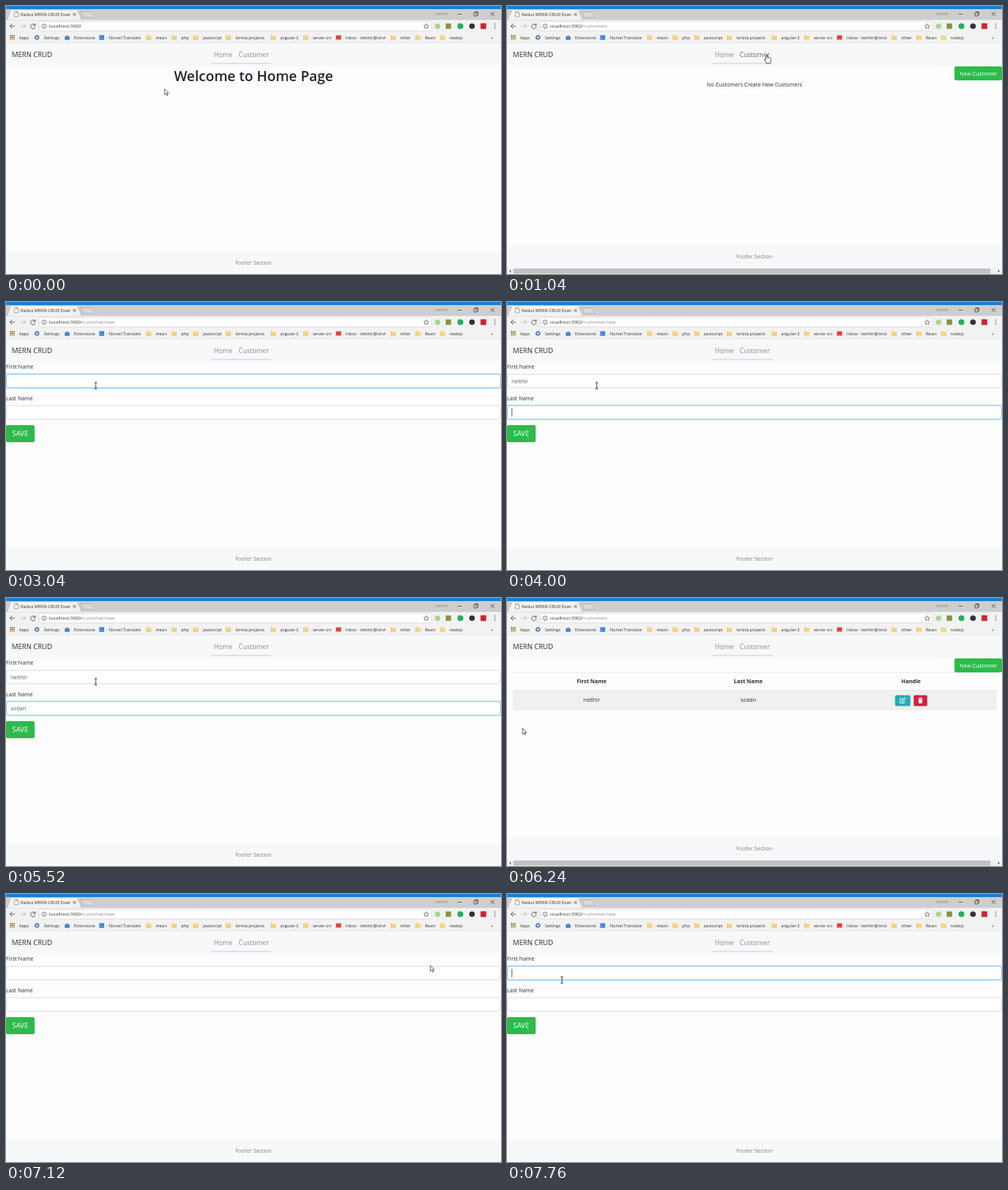
An HTML page that plays this animation: 640x346 px, repeating every 8 s.

```html
<!DOCTYPE html>
<html lang="en">
<head>
<meta charset="utf-8">
<title>MERN CRUD</title>
<style>
html, body { margin: 0; width: 100%; height: 100%; overflow: hidden; background: #fdfdfd; }
svg { display: block; width: 640px; height: 346px; font: 7px "Open Sans", "Noto Sans", sans-serif; fill: #2b3035; }
.small { font-size: 5.45px; fill: #333; }
.mid { text-anchor: middle; }
.link { font-size: 8.5px; fill: #8c8d8f; }
.green { fill: #2dba4b; }
.white { fill: #fff; }
.input { fill: #fff; stroke: #d3d7db; stroke-width: .8; }
.halo { fill: none; stroke: #c4dfff; stroke-width: 2.4; }
.value { fill: #555b61; }
.line { fill: none; stroke: #555; stroke-width: .9; }
</style>
</head>
<body>
<svg id="stage" viewBox="0 0 640 346"></svg>
<script>
const FIRST = 'nelthir', LAST = 'sodan', LOOP = 8000, STEP = 80, BLINK = 400;

const rect = (x, y, w, h, attrs = '') => `<rect x="${x}" y="${y}" width="${w}" height="${h}" ${attrs}/>`;
const text = (x, y, str, attrs = '') => `<text x="${x}" y="${y}" ${attrs}>${str}</text>`;
const path = (d, attrs = 'class="line"') => `<path d="${d}" ${attrs}/>`;
const dot = (x, y, r, fill) => `<circle cx="${x}" cy="${y}" r="${r}" fill="${fill}"/>`;
const small = (x, y, str) => text(x, y, str, 'class="small"');

const folders = [[184, 'mean'], [217, 'php'], [245, 'javascript'], [287, 'lorvita projects'], [345, 'angular 2'],
  [387, 'server src'], [500, 'other'], [532, 'React'], [564, 'nodejs']];
const appColors = ['#d9453a', '#3f9c56', '#e3a92c'];

const browser = rect(0, 0, 640, 18, 'fill="#cdced0"') + rect(0, 0, 640, 4, 'fill="#1b80cf"')
  + rect(0, 18, 640, 30, 'fill="#f2f2f2"')
  + path('M1 18.5L6 5.5Q6.4 4.5 7.5 4.5H91Q92.2 4.5 92.6 5.5L98 18.5Z', 'fill="#f2f2f2" stroke="#a9aaac" stroke-width=".6"')
  + rect(0, 18.3, 100, 1, 'fill="#f2f2f2"')
  + path('M97 7.5H109.5Q110.5 7.5 111 8.5L114 14.8H101.5Q100 14.8 99.6 14Z', 'fill="#d9dadb" stroke="#a3a4a6" stroke-width=".6"')
  + path('M11 7.5h3.2l1.6 1.6v4.8H11zM14.2 7.5v1.6h1.6', 'fill="#fff" stroke="#666" stroke-width=".6"')
  + `<clipPath id="tab">${rect(18, 4, 65, 14)}</clipPath>`
  + text(19, 12.8, 'Redux MERN CRUD Exam', 'class="small" style="font-size:5.6px" clip-path="url(#tab)"')
  + path('M86.6 9l3.8 3.8M90.4 9l-3.8 3.8')
  + text(555, 12.2, FIRST, 'style="font-size:5.3px" fill="#888"')
  + path('M584 10.5h5M605 8.8h4v4h-4zM606.2 8.8v-1.3h4v4h-1.2M626.5 7.8l5 5M631.5 7.8l-5 5')
  + path('M11.5 26H5.2M8 23l-3 3 3 3')
  + path('M18.8 26h6.3M22.3 23l3 3-3 3', 'class="line" style="stroke:#bbb"')
  + path('M37.2 24.4A3 3 0 1 0 37.8 26.8M37.9 22.8v2.4h-2.4')
  + rect(43, 20, 507, 12, 'rx="1.2" fill="#fff" stroke="#cfcfcf" stroke-width=".6"')
  + '<circle cx="49.3" cy="26" r="2.8" class="line" style="stroke-width:.7"/>' + path('M49.3 25.6v2M49.3 24.2v.6')
  + '<text class="small" x="56" y="28.2" style="font-size:6.1px">localhost:3000<tspan id="route" fill="#888"></tspan></text>'
  + path('M543.5 22.8l1 2.2 2.3.2-1.8 1.5.6 2.3-2.1-1.3-2.1 1.3.6-2.3-1.8-1.5 2.3-.2z', 'class="line" style="stroke-width:.7"')
  + dot(558, 26, 3.6, '#a8d690') + rect(568.5, 22.5, 7, 7, 'fill="#8a9440"') + dot(587.5, 26, 3.8, '#1eb062')
  + dot(602.5, 26, 3.6, '#303236') + rect(613.5, 22.3, 7.4, 7.4, 'fill="#cf2430"')
  + [23.3, 26, 28.7].map(y => dot(632, y, .8, '#555')).join('')
  + Array.from({ length: 9 }, (_, i) => rect(5 + i % 3 * 2.3, 37.6 + (i / 3 | 0) * 2.3, 1.7, 1.7, `fill="${appColors[i / 3 | 0]}"`)).join('')
  + '<circle cx="40" cy="40.6" r="2" fill="none" stroke="#4378c0" stroke-width="1.5"/>'
  + '<circle cx="40" cy="40.6" r="3" fill="none" stroke="#4378c0" stroke-width=".8" stroke-dasharray="1.18"/>'
  + path('M76 39.3h2v-.6a1 1 0 0 1 2 0v.6h2v1.6a1 1 0 0 1 0 1.9v1h-6z', 'fill="#4b82c8"')
  + rect(120.5, 37.6, 6.4, 6.2, 'fill="#4a86e0"') + rect(426.5, 37.8, 6.8, 5.6, 'fill="#d8483c"')
  + [[17, 'Apps'], [49, 'Settings'], [88, 'Extensions'], [133, 'Norvel Translate']].map(([x, s]) => small(x, 42.5, s)).join('')
  + folders.map(([x, s]) => path(`M${x} 38h2.3l.8.9h2.9v4.7h-6z`, 'transform="translate(-2.5)" fill="#f5d57c" stroke="#e3ba50" stroke-width=".4"') + small(x + 9.5, 42.5, s)).join('')
  + `<clipPath id="mail">${rect(439, 34, 52, 13)}</clipPath>`
  + text(439, 42.5, `Inbox - ${FIRST}@lorvita`, 'class="small" clip-path="url(#mail)"')
  + small(627, 42.5, '»') + rect(0, 47, 640, .8, 'fill="#dcdcdc"');

const nav = rect(0, 47.8, 640, 30.2, 'fill="#f7f8fa"') + text(7.5, 66.4, 'MERN CRUD', 'style="font-size:9px"')
  + text(268.8, 66.3, 'Home', 'id="homeLink" class="link"') + text(300.8, 66.3, 'Customer', 'id="customerLink" class="link"')
  + rect(264.5, 73.6, 78.5, .9, 'fill="#c9cacc"');

const footer = '<g id="footer">' + rect(0, 316, 640, 30, 'fill="#f7f8fa"')
  + text(320, 333.5, 'Footer Section', 'class="mid" fill="#7d8084"') + '</g>';

const home = '<g id="home">' + text(320, 96.8, 'Welcome to Home Page', 'class="mid" font-weight="600" style="font-size:18px" fill="#212529"') + '</g>';

const head = (x, s) => text(x, 110.2, s, 'class="mid" font-weight="700"');
const list = '<g id="list">' + rect(0, 338, 640, 8, 'fill="#f1f1f1"') + rect(8.5, 339, 616.5, 6.4, 'fill="#c1c1c1"')
  + path('M5 340.4v3.6l-2-1.8zM635 340.4v3.6l2-1.8z', 'fill="#555"')
  + text(320, 104, 'No Customers Create New Customers', 'id="empty" class="mid"')
  + '<g id="table">' + rect(7.5, 96, 625.5, .7, 'fill="#e3e5e8"') + rect(7.5, 118.8, 625.5, 1.1, 'fill="#e3e5e8"')
  + rect(7.5, 119.9, 625.5, 25.3, 'fill="#f0f0ef"')
  + head(109.5, 'First Name') + head(312, 'Last Name') + head(522.5, 'Handle')
  + text(109.3, 134, FIRST, 'class="mid"') + text(312, 134, LAST, 'class="mid"')
  + rect(501.7, 125.5, 19.8, 14, 'rx="1.6" fill="#22adb7"') + rect(525.8, 125.5, 17.6, 14, 'rx="1.6" fill="#d3223f"')
  + path('M512 130h-3.8v5.5h5.5v-2.3M510.6 133.4l.3-1.5 3.6-3.4 1.2 1.2-3.6 3.5z', 'fill="none" stroke="#fff" stroke-width=".9"')
  + path('M531.4 130.2h6.2M533.5 130v-1.2h2V130', 'fill="none" stroke="#fff" stroke-width=".8"')
  + path('M532 130.9h5l-.4 5h-4.2z', 'class="white"') + '</g>'
  + rect(578.5, 78, 61.5, 18, 'id="newButton" rx="1.8"') + text(609.5, 89.7, 'New Customer', 'class="mid white"') + '</g>';

const field = (id, label, y) => text(0, y - 6.6, label)
  + rect(.5, y + .3, 639, 17.4, `id="${id}Halo" class="halo" rx="2"`) + rect(.5, y + .3, 639, 17.4, `id="${id}Box" class="input" rx="2"`)
  + text(6, y + 11.5, '', `id="${id}Value" class="value"`);
const form = '<g id="form">' + field('first', 'First Name', 93) + field('last', 'Last Name', 133.5)
  + rect(5.8, 0, .8, 10.5, 'id="caret" fill="#333"')
  + rect(0, 159, 37, 22, 'id="save" rx="2"') + text(18.4, 173.3, 'SAVE', 'class="mid white" style="font-size:9px"') + '</g>';

const pointers = '<g id="pointer">'
  + path('M0 0V7.6L1.8 6 3 8.7 4.2 8.1 3 5.6H5.3Z', 'id="arrow" fill="#fff" stroke="#333" stroke-width=".7"')
  + path('M-1 5.6V.7Q-.1-.6.8.7V3.5Q5.3 3.4 5.3 5.4V7.6Q5 9 4.4 9.6V11H-.6V10Q-2.5 8-3.2 6.2Q-2.6 4.8-1 6.2Z', 'id="hand" fill="#fff" stroke="#333" stroke-width=".8"')
  + path('M-1.8-4H1.8M0-4V4M-1.8 4H1.8', 'id="beam" class="line" style="stroke:#333"') + '</g>';

document.getElementById('stage').innerHTML = browser + nav + footer + home + list + form + pointers;
const $ = id => document.getElementById(id);
const show = (id, on) => $(id).style.display = on ? '' : 'none';

const moves = [[0, 205, 107], [880, 336, 63], [1040, 336, 63], [1640, 614, 92], [1840, 614, 92], [2480, 116, 108],
  [5600, 116, 108], [6000, 20, 168], [6240, 20, 168], [6480, 92, 150], [6720, 586, 87], [6880, 604, 90],
  [7040, 604, 90], [7440, 71, 111], [LOOP, 71, 111]];
const pages = [[0, 'home'], [960, 'list'], [1840, 'form'], [6240, 'list'], [7040, 'form']];
const focuses = [[0, ''], [2640, 'first'], [3920, 'last'], [6240, ''], [7600, 'first']];
const firstKeys = Array.from(FIRST, (_, i) => 3200 + i * 80);
const lastKeys = [4400, 4560, 4720, 4880, 5120];
const routes = { home: '', list: '/customers', form: '/customer/new' };
const latest = (rows, t) => rows.filter(row => row[0] <= t).pop();

function pointerAt(t) {
  const i = moves.findIndex(m => m[0] > t);
  const [t0, x0, y0] = moves[i - 1], [t1, x1, y1] = moves[i];
  const p = (t - t0) / (t1 - t0), e = p * p * (3 - 2 * p);
  return [x0 + (x1 - x0) * e, y0 + (y1 - y0) * e];
}

function hitAt(t) {
  const [x, y] = pointerAt(Math.max(0, t)), page = latest(pages, Math.max(0, t))[1];
  if (y > 55 && y < 73 && x > 265 && x < 343) return x < 297 ? 'homeLink' : 'customerLink';
  if (page === 'list' && x > 578 && y > 78 && y < 96) return 'newButton';
  if (page === 'form' && x < 37 && y > 159 && y < 181) return 'save';
  if (page === 'form' && (y > 93 && y < 111.5 || y > 133 && y < 151)) return 'input';
  return '';
}

function draw(t) {
  const page = latest(pages, t)[1], [focusTime, focus] = latest(focuses, t);
  const saved = t >= 6240, hit = hitAt(t), hover = hitAt(t - STEP);
  Object.keys(routes).forEach(id => show(id, id === page));
  $('route').textContent = routes[page];
  $('footer').setAttribute('transform', `translate(0 ${page === 'list' ? -8 : 0})`);
  show('empty', !saved);
  show('table', saved);

  ['homeLink', 'customerLink'].forEach(id => $(id).style.fill = hover === id ? '#66686b' : '');
  ['newButton', 'save'].forEach(id => $(id).style.fill = hover === id ? '#279541' : '#2dba4b');

  const typed = keys => saved ? 0 : keys.filter(k => k <= t).length;
  $('firstValue').textContent = FIRST.slice(0, typed(firstKeys));
  $('lastValue').textContent = LAST.slice(0, typed(lastKeys));
  ['first', 'last'].forEach(id => {
    show(id + 'Halo', focus === id);
    $(id + 'Box').style.stroke = focus === id ? '#80bdff' : '';
  });

  const lastEvent = Math.max(focusTime, ...[...firstKeys, ...lastKeys].filter(k => k <= t));
  const caretOn = focus && Math.floor((t - lastEvent) / BLINK) % 2 === 0;
  show('caret', caretOn);
  if (caretOn && page === 'form') {
    const width = $(focus + 'Value').getComputedTextLength();
    $('caret').setAttribute('transform', `translate(${width} ${focus === 'first' ? 96.8 : 137.3})`);
  }

  const shape = hit === 'input' ? 'beam' : hit ? 'hand' : 'arrow';
  ['arrow', 'hand', 'beam'].forEach(id => show(id, id === shape));
  $('pointer').setAttribute('transform', `translate(${pointerAt(t)})`);
}

function frame() {
  const t = performance.now() % LOOP;
  draw(Math.floor(t / STEP) * STEP);
  requestAnimationFrame(frame);
}
frame();
</script>
</body>
</html>
```
